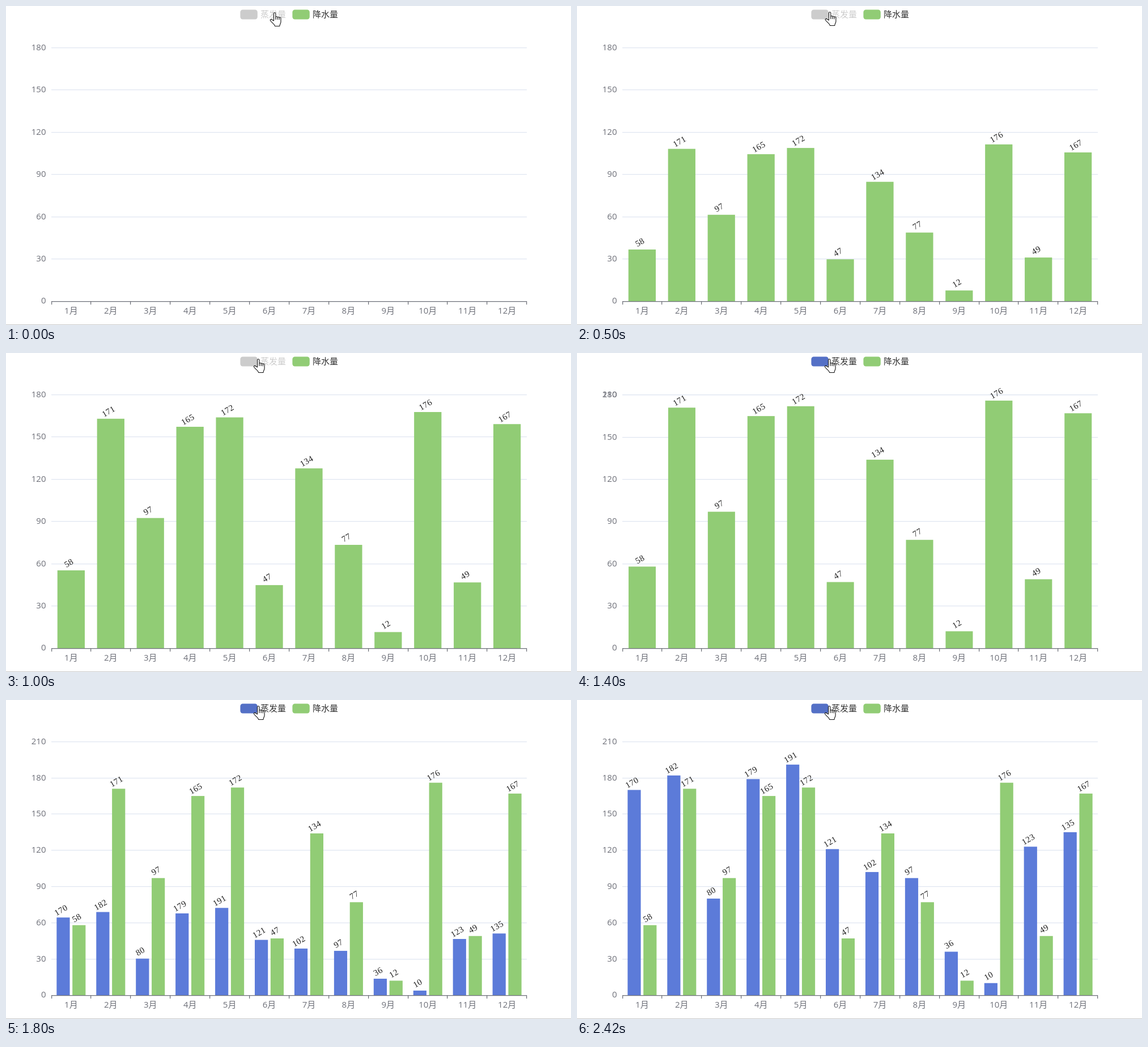
These frames come from a looping animation (997 by 562 pixels, 2550 ms). An HTML page with a canvas:

```html
<!DOCTYPE html>
<html lang="zh">
<head>
<meta charset="utf-8">
<style>
  html, body { margin: 0; width: 100%; height: 100%; overflow: hidden; background: #fff; }
  canvas { display: block; }
</style>
</head>
<body>
<canvas id="stage" width="997" height="562"></canvas>
<script>
const ctx = document.getElementById('stage').getContext('2d');
const LOOP = 2550;
const LEFT = 79.9, RIGHT = 919.1, TOP = 73.4, BASE = 520;
const BAND = (RIGHT - LEFT) / 12, HEIGHT = BASE - TOP;
const RESCALE = 1340, BLUE_START = 1548;
const GREEN = '#91cc75', BLUE = '#5470c6', BLUE_LIT = '#5c7bd9';
const AXIS = '#6e7079', GRID = '#e0e6f1', OFF = '#ccc';
const SANS = '15px "Open Sans", "Noto Sans CJK SC", "Noto Sans CJK", sans-serif';
const SERIF = '15px "Liberation Serif", "Noto Serif", serif';
const evaporation = [170, 182, 80, 179, 191, 121, 102, 97, 36, 10, 123, 135];
const rainfall = [58, 171, 97, 165, 172, 47, 134, 77, 12, 176, 49, 167];

const handShape = new Path2D('M7 15V2.4a1.7 1.7 0 0 1 3.4 0V9c0-2 3.2-2 3.2 .3c.3-1.6 3-1.5 3 .6' +
  'c.4-1.4 2.9-1.2 2.9 .8V17c0 3-2 4-2.2 7.5H9C8.5 21 3.5 18.5 1 14.8c-1-1.8 1.3-3.2 2.8-1.8Z');
const handLines = new Path2D('M10.4 9v4M13.6 9.5v3.5M16.6 10.3v3');

const clamp = x => Math.min(1, Math.max(0, x));
const lerp = (a, b, k) => a + (b - a) * k;
const cubicOut = x => 1 - (1 - x) ** 3;
const cubicInOut = x => x < .5 ? 4 * x ** 3 : 1 - 4 * (1 - x) ** 3;

function stepTime(t) {
  return t < 2020 ? Math.floor(t / 100) * 100
                  : Math.min(2420, 2020 + Math.floor((t - 2020) / 100) * 100);
}

// Linear progress of the blue bars, which speeds up near the end.
function blueProgress(t) {
  return t < 2000 ? clamp((t - BLUE_START) / 1719) : lerp(.263, 1, clamp((t - 2000) / 420));
}

function text(str, x, y, color, align) {
  ctx.fillStyle = color;
  ctx.textAlign = align;
  ctx.fillText(str, x, y);
}

function rect(x, y, w, h, color) {
  ctx.fillStyle = color;
  ctx.fillRect(x, y, w, h);
}

function legend(x, name, color, textColor) {
  ctx.fillStyle = color;
  ctx.beginPath();
  ctx.roundRect(x, 6.5, 30.4, 17, 4.4);
  ctx.fill();
  text(name, x + 35.6, 20, textColor, 'left');
}

function gridLine(value, y) {
  if (value) rect(80, Math.round(y - .6), 839, 1.25, GRID);
}

function barLabel({ value, x, w, h }) {
  ctx.save();
  ctx.translate(x + w / 2, BASE - h - 6);
  ctx.rotate(-Math.PI / 6);
  text(value, 0, -3, '#222', 'center');
  ctx.restore();
}

function cursor(x, y) {
  ctx.save();
  ctx.translate(x, y);
  ctx.fillStyle = '#fff';
  ctx.strokeStyle = '#111';
  ctx.lineWidth = 1.1;
  ctx.lineJoin = 'round';
  ctx.fill(handShape);
  ctx.stroke(handShape);
  ctx.stroke(handLines);
  ctx.restore();
}

function draw(t) {
  const both = t >= RESCALE;
  const shift = cubicInOut(clamp((t - RESCALE) / 460));
  const grow = both ? 1 : cubicOut(clamp((t - 100) / 1410));
  const rise = cubicOut(blueProgress(t));
  // Height of a value while the axis rescales from 180 to 210.
  const scaled = v => HEIGHT * v * lerp(1 / 180, 1 / 210, shift);

  rect(0, 0, 997, 562, '#fff');
  ctx.font = SANS;
  ctx.letterSpacing = '0px';

  const ticks = [0, 30, 60, 90, 120, 150, 180].map(v => [v, BASE - scaled(v)]);
  if (both) ticks.push([210, TOP]);
  for (const [v, y] of ticks) {
    gridLine(v, y);
    text(v, 70.5, y + 4.4, AXIS, 'right');
  }

  const greens = rainfall.map((value, i) => ({
    value,
    x: LEFT + BAND * (i + lerp(.155, .135 + .73 * 1.2 / 2.2, shift)),
    w: BAND * lerp(.69, .73 / 2.2, shift),
    h: scaled(value) * grow
  }));
  const blues = t >= BLUE_START ? evaporation.map((value, i) => ({
    value, x: LEFT + BAND * (i + .135), w: BAND * .73 / 2.2,
    h: HEIGHT * value / 210 * rise
  })) : [];

  for (const b of greens) rect(b.x, BASE - b.h, b.w, b.h, GREEN);
  for (const b of blues) rect(b.x, BASE - b.h, b.w, b.h, BLUE_LIT);

  rect(80, BASE, 839, 1.25, AXIS);
  for (let i = 0; i <= 12; i++) {
    rect(Math.max(80, Math.floor(LEFT + BAND * i - .3)), BASE, 1.25, 6, AXIS);
    if (i < 12) text(i + 1 + '月', LEFT + BAND * (i + .5), 541.5, AXIS, 'center');
  }

  legend(413.4, '蒸发量', both ? BLUE : OFF, both ? '#333' : OFF);
  legend(505.4, '降水量', GREEN, '#333');

  if (t >= 100) {
    ctx.font = SERIF;
    ctx.letterSpacing = '0.5px';
    greens.concat(blues).forEach(barLabel);
  }

  rect(0, 561, 997, 1, '#c8c8c8');
  const move = clamp(t / 400);
  cursor(lerp(465.5, t < 600 ? 437.4 : 436.6, move), lerp(11, 10, move));
}

const start = performance.now();
function tick() {
  draw(stepTime((performance.now() - start) % LOOP));
  requestAnimationFrame(tick);
}
tick();
</script>
</body>
</html>
```
